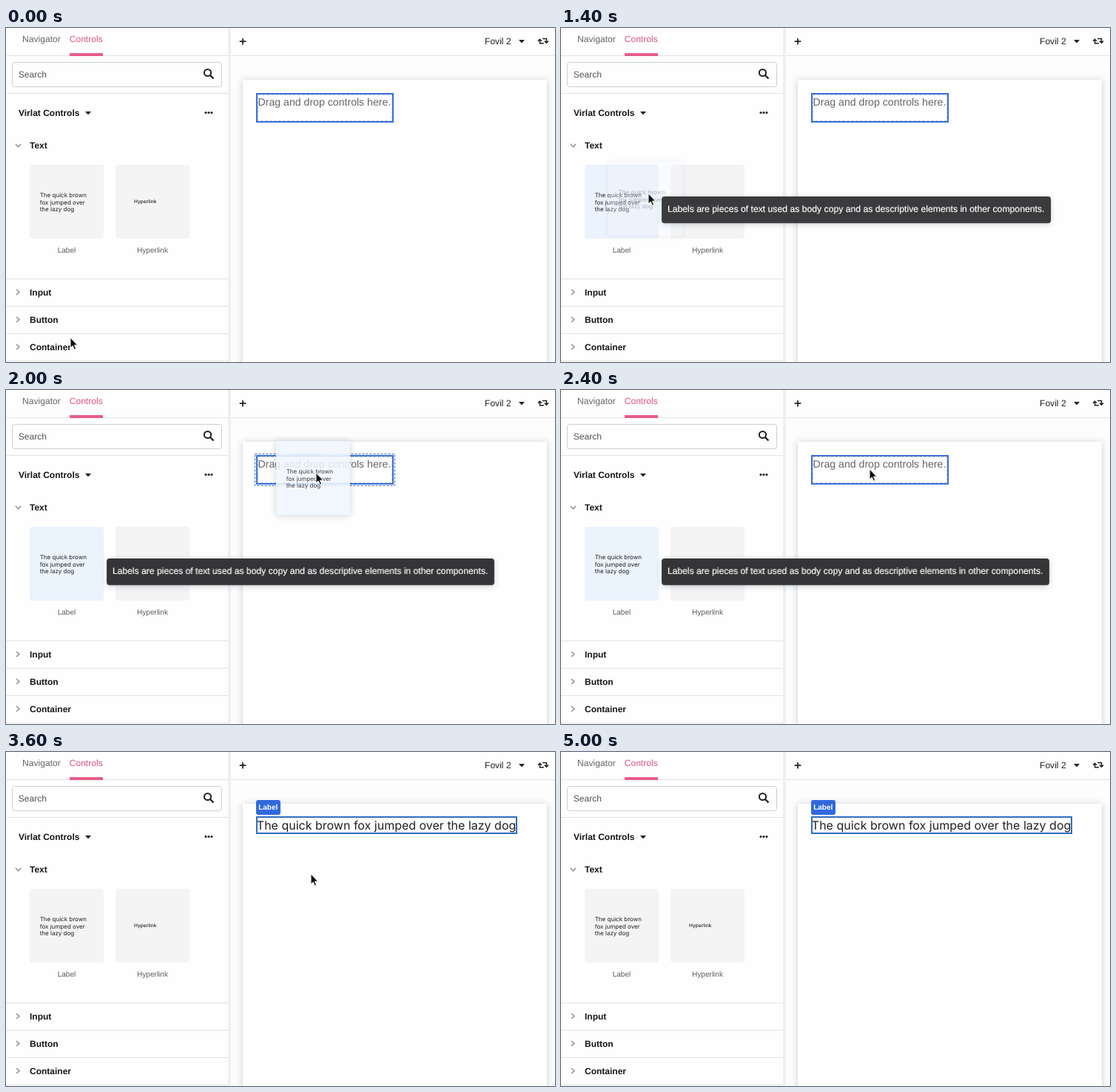
Write an HTML page that moves like this. It is 742x452 px and loops after 5600 ms.

```html
<!DOCTYPE html>
<html lang="en">
<head>
<meta charset="utf-8">
<title>Drag a label onto the canvas</title>
<style>
  html, body { margin: 0; width: 100%; height: 100%; overflow: hidden; background: #fdfdfd; }
  svg { display: block; width: 742px; height: 452px; }
  text {
    font: 12.1px "Liberation Sans", Arial, sans-serif;
    fill: #222;
    text-rendering: geometricPrecision;
  }
  .bold { font-weight: bold; font-size: 12px; fill: #161616; }
  .muted { fill: #666; }
  .caption { font-size: 10.1px; fill: #5c5c5c; text-anchor: middle; }
  .sample { font: 8px Inter, sans-serif; }
  .link { font: 500 6.6px Inter, sans-serif; }
  .hint { font-size: 14.13px; fill: #666; }
  .dropped { font: 16px Inter, sans-serif; }
  .badge { font-size: 10px; fill: #fff; }
  .tip-text { font-size: 12.17px; fill: #fff; stroke: #fff; stroke-width: .2; }
  .rule { stroke: #e2e2e2; }
  .stroke { fill: none; stroke: #222; stroke-width: 2; }
  .chevron { fill: none; stroke: #8c8c8c; stroke-width: 1.4; }

  /* Every change is a hard step on a 200 ms grid. */
  .move, .tip, .tile, .ghost, .target, .empty, .filled, .arrow, .hand {
    animation: 5.6s step-end infinite;
  }
  .move { animation-name: move; }
  .tip { animation-name: tip; transform-origin: 136px 246px; }
  .tile { animation-name: tile; fill: #f4f4f5; }
  .ghost { animation-name: ghost; }
  .target { animation-name: target; }
  .empty { animation-name: empty; }
  .filled { animation-name: filled; }
  .arrow { animation-name: arrow; }
  .hand { animation-name: hand; }

  @keyframes move {
    0% { transform: translate(87px, 419px); }
    3.57% { transform: translate(67px, 329px); }
    7.14% { transform: translate(81px, 259px); }
    10.71% { transform: translate(88px, 240px); }
    17.85% { transform: translate(87px, 236px); }
    21.42% { transform: translate(86px, 228px); }
    25% { transform: translate(118px, 224px); }
    28.57% { transform: translate(215px, 186px); }
    32.14% { transform: translate(345px, 132px); }
    35.71% { transform: translate(419px, 112px); }
    39.28% { transform: translate(427px, 112px); }
    42.85% { transform: translate(417px, 107px); }
    64.28% { transform: translate(412px, 165px); }
    67.85% { transform: translate(407px, 220px); }
    71.42% { transform: translate(389px, 327px); }
    75%, 100% { transform: translate(354px, 412px); }
  }
  @keyframes tip {
    0% { opacity: 0; transform: none; }
    25% { opacity: .97; transform: scale(1.004); }
    28.57% { opacity: 1; transform: none; }
    64.28%, 100% { opacity: 0; transform: none; }
  }
  @keyframes tile {
    0% { fill: #f4f4f5; }
    25% { fill: #ebf3fd; }
    64.28%, 100% { fill: #f4f4f5; }
  }
  @keyframes ghost {
    0% { opacity: 0; }
    25% { opacity: .3; }
    28.57% { opacity: .87; }
    42.85%, 100% { opacity: 0; }
  }
  @keyframes target {
    0% { opacity: 0; }
    35.71% { opacity: 1; }
    42.85%, 100% { opacity: 0; }
  }
  @keyframes empty { 0% { opacity: 1; } 46.42%, 100% { opacity: 0; } }
  @keyframes filled { 0% { opacity: 0; } 46.42%, 100% { opacity: 1; } }
  @keyframes arrow {
    0% { opacity: 1; }
    50% { opacity: 0; }
    64.28% { opacity: 1; }
    78.57%, 100% { opacity: 0; }
  }
  @keyframes hand {
    0% { opacity: 0; }
    50% { opacity: 1; }
    64.28%, 100% { opacity: 0; }
  }
</style>
</head>
<body>
<svg viewBox="0 0 742 452">
  <defs>
    <filter id="soft" x="-20%" y="-20%" width="140%" height="140%">
      <feDropShadow dx="0" dy="1" stdDeviation="4" flood-color="#3c4250" flood-opacity=".28"/>
    </filter>
    <filter id="faint" x="-5%" y="-60%" width="110%" height="220%">
      <feDropShadow dx="0" dy="2" stdDeviation="4" flood-color="#3c4250" flood-opacity=".2"/>
    </filter>
    <g id="sample">
      <text class="sample" x="13.7" y="44">The quick brown</text>
      <text class="sample" x="13.7" y="53.5">fox jumped over</text>
      <text class="sample" x="13.7" y="63">the lazy dog</text>
    </g>
    <path id="caret" d="M-4-2H4L0 2.5Z" fill="#222"/>
    <path id="chevron" class="chevron" d="M-2-3.5L2 0L-2 3.5"/>
  </defs>

  <!-- Canvas -->
  <rect width="742" height="452" fill="#fdfdfd"/>
  <rect x="320" y="70" width="411" height="420" fill="#fefefe" filter="url(#soft)"/>
  <rect x="304" width="438" height="37" fill="#fefefe"/>
  <path class="rule" d="M304 37.5H742"/>
  <path class="stroke" d="M320 14V22.5M315.7 18.2H324.3" style="stroke-width:1.7"/>
  <text x="647" y="22">Fovil 2</text>
  <use href="#caret" x="697" y="18"/>
  <g class="stroke" transform="translate(726 17.7) scale(.9)" style="stroke-width:1.7">
    <path d="M-1-3.5H5V2.3M2.2-.1L5 2.7L7.8-.1"/>
    <path d="M1 3.5H-5V-2.3M-7.8 .1L-5-2.7L-2.2 .1"/>
  </g>

  <g class="empty">
    <text class="hint" x="340.5" y="105">Drag and drop controls here.</text>
    <rect x="340.5" y="90.5" width="181" height="35" fill="none" stroke="#b9c5da" stroke-dasharray="3 3"/>
    <rect x="339" y="89" width="184" height="38" fill="none" stroke="#3a6fd8" stroke-width="2"/>
    <rect class="target" x="336.5" y="86.5" width="189" height="43" fill="none" stroke="#3a6fb8" stroke-dasharray="3 2"/>
  </g>
  <g class="filled">
    <text class="dropped" x="338.8" y="105">The quick brown fox jumped over the lazy dog</text>
    <rect x="339" y="88" width="351" height="22" fill="none" stroke="#2f6dc4" stroke-width="2"/>
    <rect x="338" y="65" width="33" height="20" rx="3" fill="#3069dc"/>
    <text class="bold badge" x="341.2" y="78">Label</text>
  </g>

  <!-- Side panel -->
  <rect width="300" height="452" fill="#fefefe"/>
  <rect x="300" width="4" height="452" fill="#f0f0f2"/>
  <path class="rule" d="M0 37.5H300M0 88.5H300M0 339.5H300M0 376.5H300M0 413.5H300M0 450.5H300"/>
  <text class="muted" x="22" y="19">Navigator</text>
  <text x="85.7" y="19" style="fill:#dd5580">Controls</text>
  <rect x="86" y="34" width="45" height="4" fill="#e75d87"/>

  <rect x="8.5" y="46.5" width="283" height="33" rx="3" fill="#fefefe" stroke="#cfcfcf"/>
  <text x="16.7" y="67" style="fill:#555">Search</text>
  <circle class="stroke" cx="272.5" cy="60.5" r="4.6"/>
  <path class="stroke" d="M276 64L280.5 68.5" style="stroke-width:2.4"/>

  <text class="bold" x="17" y="119">Virlat Controls</text>
  <use href="#caret" x="111" y="115"/>
  <path d="M270 114.5h0M274 114.5h0M278 114.5h0" stroke="#222" stroke-width="3.2" stroke-linecap="round"/>

  <use href="#chevron" transform="translate(16.5 159) rotate(90)"/>
  <text class="bold" x="32" y="163">Text</text>
  <rect class="tile" x="32" y="185" width="100" height="100" rx="4"/>
  <use href="#sample" x="32" y="185"/>
  <text class="caption" x="82" y="304">Label</text>
  <rect x="148" y="185" width="100" height="100" rx="4" fill="#f4f4f5"/>
  <text class="link" x="173" y="237">Hyperlink</text>
  <text class="caption" x="198" y="304">Hyperlink</text>

  <use href="#chevron" x="16" y="357.5"/>
  <text class="bold" x="32" y="362">Input</text>
  <use href="#chevron" x="16" y="394.5"/>
  <text class="bold" x="32" y="399">Button</text>
  <use href="#chevron" x="16" y="431.5"/>
  <text class="bold" x="32" y="436">Container</text>

  <!-- Dragged copy -->
  <g class="move">
    <g class="ghost">
      <g transform="translate(-54 -43)">
        <rect width="100" height="100" rx="3" fill="#f1f6fe" filter="url(#soft)"/>
        <use href="#sample"/>
      </g>
    </g>
  </g>

  <g class="tip">
    <rect x="136" y="228" width="524" height="36" rx="4" fill="#353639" filter="url(#faint)"/>
    <text class="tip-text" x="143.8" y="249">Labels are pieces of text used as body copy and as descriptive elements in other components.</text>
  </g>

  <!-- Pointer -->
  <g class="move" stroke-linejoin="round">
    <path class="arrow" d="M0 0V14L3.2 11.1L5.3 16.2L7.6 15.2L5.5 10.2H9.7Z" fill="#111" stroke="#fff"/>
    <path class="hand" transform="translate(-7.8 -3)" fill="#fff" stroke="#111" stroke-width="1.1"
      d="M4.5 9L3 4.5q-.3-1.8 1-2q1 0 1.5 1.6L6.3 7L6 2q0-1.5 1.2-1.5q1.2 0 1.3 1.5L8.8 7L9.4 2q.2-1.4 1.3-1.2q1.1 .1 1 1.5L11.3 7.5L12.4 4.2q.5-1.2 1.4-.9q1 .4 .7 1.7L13.2 10q-.3 3-1.8 5v2H5v-1.6L1 10.5q-1-1.6 0-2.2q1-.4 2 .8Z"/>
  </g>
</svg>
</body>
</html>
```
